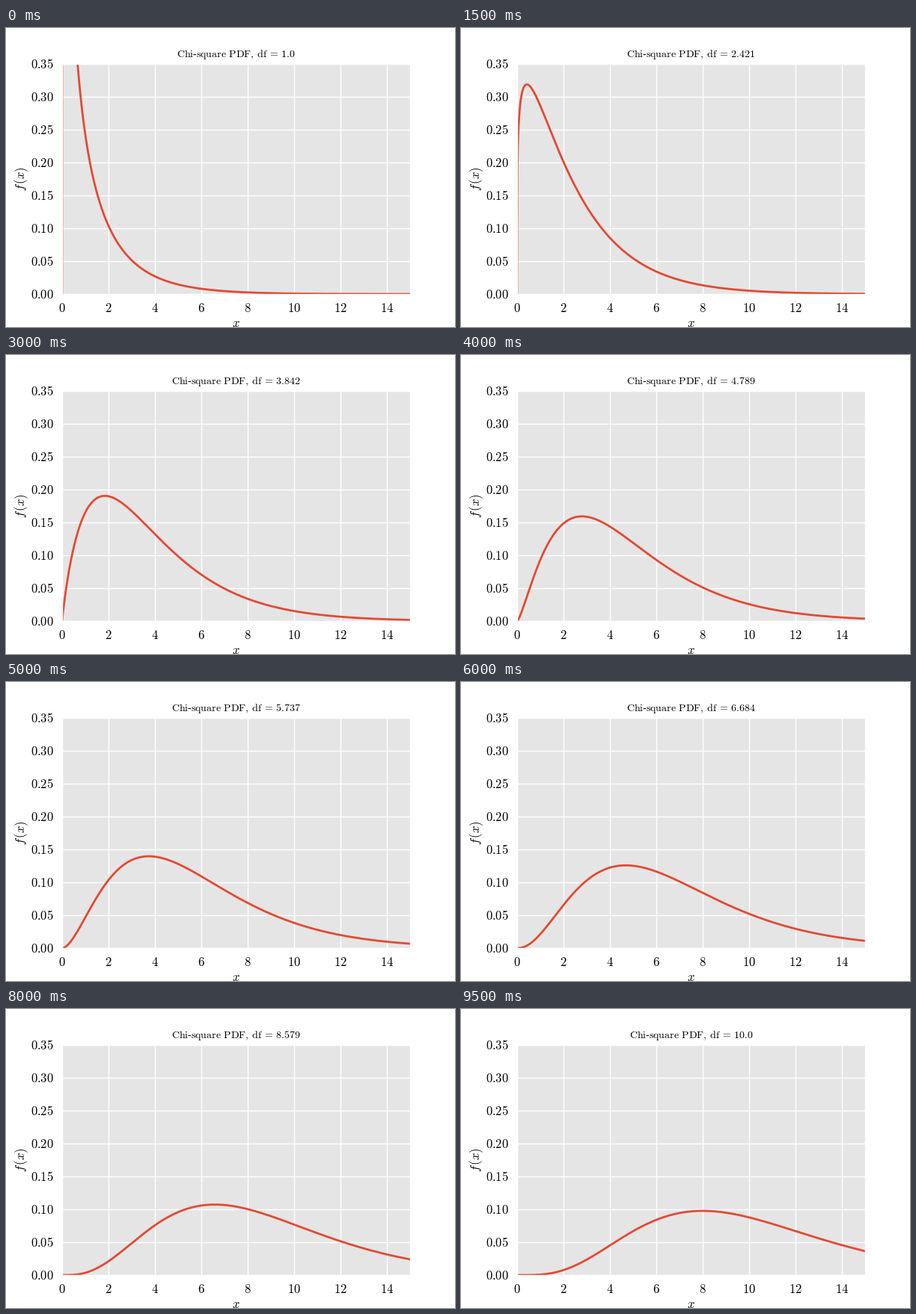
A matplotlib script for the animation above (10000 ms loop, 600 px wide and 400 px high).

```python
import math

import matplotlib.pyplot as plt
import numpy as np
from matplotlib.animation import FuncAnimation

WIDTH, HEIGHT, DPI = 600, 400, 100
FRAMES, INTERVAL = 20, 500

plt.rcParams["mathtext.fontset"] = "cm"
plt.rcParams["font.family"] = "Liberation Serif"

fig = plt.figure(figsize=(WIDTH / DPI, HEIGHT / DPI), dpi=DPI, facecolor="white")
ax = fig.add_axes([0.125, 0.11, 0.775, 0.77], facecolor="#E5E5E5")


def label(x, y, text, size=12, **options):
    """Place text with its baseline at stage pixel (x, y), y pointing down."""
    options = {"ha": "center", "va": "baseline", **options}
    return fig.text(x / WIDTH, 1 - y / HEIGHT, text, fontsize=size,
                    color="black", **options)


def roman(text):
    return rf"$\mathrm{{{text}}}$"


def title_text(df):
    gap = r"\hspace{0.38}"
    thin = r"\hspace{0.18}"  # the relation sign brings its own spacing
    return (roman("Chi") + "\u2010"
            + rf"$\mathrm{{square}}{gap}\mathrm{{PDF}}{{,}}{gap}"
            + rf"\mathrm{{df}}{thin}={thin}\mathrm{{{round(df, 3)}}}$")


def chi_square_pdf(x, df):
    half = df / 2
    pdf = np.zeros_like(x)
    pos = x > 0
    pdf[pos] = (x[pos] ** (half - 1) * np.exp(-x[pos] / 2)
                / (2 ** half * math.gamma(half)))
    return pdf


ax.set(xlim=(0, 15), ylim=(0, 0.35))
ax.set_xticks(range(0, 15, 2))
ax.set_yticks(np.arange(8) * 0.05)
ax.set_axisbelow(True)
ax.grid(color="white", linewidth=1, linestyle="-")
ax.tick_params(length=0, labelbottom=False, labelleft=False)
for spine in ax.spines.values():
    spine.set(color="white", linewidth=1)

for tick in range(0, 15, 2):
    label(75 + 31 * tick, 380.5, roman(tick))
for step in range(8):
    label(63.5, 361.5 - 44 * step, roman(f"{step * 0.05:.2f}"), ha="right")
label(307.5, 399.5, "$x$")
label(25.5, 201.5, r"$f\hspace{0.12}(x)$", rotation=90, rotation_mode="anchor")
title = label(307.5, 39.5, "", size=10)

xs = np.linspace(0, 15, 1000)
curve, = ax.plot([], [], color="#E24A33", linewidth=2)


def update(frame):
    df = 1 + 9 * frame / (FRAMES - 1)
    curve.set_data(xs, chi_square_pdf(xs, df))
    title.set_text(title_text(df))
    return curve, title


animation = FuncAnimation(fig, update, frames=FRAMES, interval=INTERVAL,
                          repeat=True, repeat_delay=0, blit=False)
plt.show()
```
